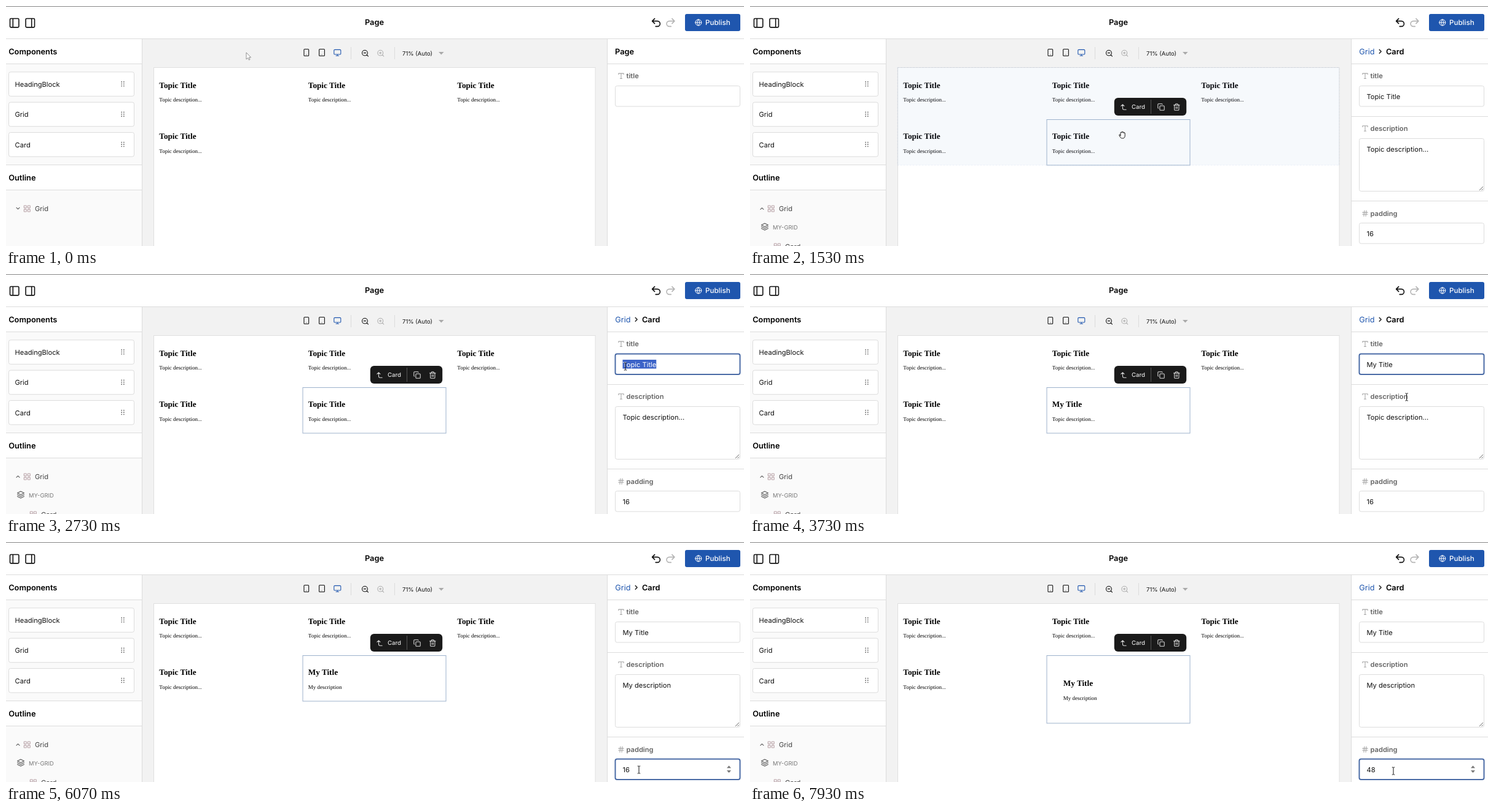
An HTML page that plays this animation: 1201x392 px, repeating every 8000 ms.

```html
<!DOCTYPE html>
<html lang="en">
<head>
<meta charset="utf-8">
<title>Page editor</title>
<style>
html, body { margin: 0; width: 100%; height: 100%; overflow: hidden; background: #fff; }
svg { display: block; width: 100%; height: 100%; }
text { font-family: Inter, sans-serif; white-space: pre; text-rendering: geometricPrecision; }
.serif { font-family: "Liberation Serif", serif; }
</style>
</head>
<body>
<svg id="stage" viewBox="0 0 1201 392"></svg>
<script>
const LOOP = 8000;
const LINE = '#dcdcdc', INK = '#111', BLUE = '#1f56ae';
const ZOOM = 0.5625;

// Markup helpers
const rect = (x, y, w, h, fill, more = '') =>
  `<rect x="${x}" y="${y}" width="${w}" height="${h}" fill="${fill}" ${more}/>`;
const line = (x1, y1, x2, y2, color = LINE) =>
  `<path d="M${x1} ${y1}L${x2} ${y2}" stroke="${color}"/>`;
const text = (x, y, size, str, fill = INK, weight = 400, more = '') =>
  `<text x="${x}" y="${y}" font-size="${size}" fill="${fill}" font-weight="${weight}" ${more}>${str}</text>`;
const group = (id, body, more = '') => `<g id="${id}" ${more}>${body}</g>`;
const icon = (x, y, scale, d, color = INK, width = 2) =>
  `<path transform="translate(${x} ${y}) scale(${scale}) translate(-12 -12)" d="${d}" fill="none"
    stroke="${color}" stroke-width="${width}" stroke-linecap="round" stroke-linejoin="round"/>`;
const box = (x, y, w, h, r = 2) =>
  `M${x + r} ${y}h${w - 2 * r}a${r} ${r} 0 0 1 ${r} ${r}v${h - 2 * r}a${r} ${r} 0 0 1 ${-r} ${r}` +
  `h${2 * r - w}a${r} ${r} 0 0 1 ${-r} ${-r}v${2 * r - h}a${r} ${r} 0 0 1 ${r} ${-r}z`;
const disc = (x, y, r) => `M${x - r} ${y}a${r} ${r} 0 1 0 ${2 * r} 0a${r} ${r} 0 1 0 ${-2 * r} 0`;

const ICON = {
  panelLeft: box(3, 3, 18, 18) + 'M9 3v18',
  panelRight: box(3, 3, 18, 18) + 'M15 3v18',
  undo: 'M9 14 4 9l5-5M4 9h10.5a5.5 5.5 0 0 1 0 11H11',
  redo: 'M15 14l5-5-5-5M20 9H9.500a5.500 5.500 0 0 0 0 11H13',
  globe: disc(12, 12, 10) + 'M2 12h20M12 2a14.500 14.500 0 0 0 0 20a14.500 14.500 0 0 0 0-20',
  phone: box(5, 2, 14, 20) + 'M12 18h.01',
  tablet: box(4, 2, 16, 20) + 'M12 18h.01',
  monitor: box(2, 3, 20, 14) + 'M8 21h8M12 17v4',
  zoomOut: disc(11, 11, 8) + 'M21 21l-4.35-4.35M8 11h6',
  zoomIn: disc(11, 11, 8) + 'M21 21l-4.35-4.35M8 11h6M11 8v6',
  type: 'M4 7V4h16v3M9 20h6M12 4v16',
  hash: 'M4 9h16M4 15h16M10 3 8 21M16 3l-2 18',
  grid: box(3, 3, 7, 7, 1) + box(14, 3, 7, 7, 1) + box(14, 14, 7, 7, 1) + box(3, 14, 7, 7, 1),
  layers: 'M12 2l10 5-10 5L2 7zM2 12l10 5 10-5M2 17l10 5 10-5',
  down: 'M6 9l6 6 6-6',
  up: 'M18 15l-6-6-6 6',
  right: 'M9 18l6-6-6-6',
  parent: 'M14 9 9 4 4 9M20 20h-7a4 4 0 0 1-4-4V4',
  copy: box(8, 8, 14, 14) + 'M4 16c-1.1 0-2-.9-2-2V4c0-1.1.9-2 2-2h10c1.1 0 2 .9 2 2',
  trash: 'M3 6h18M19 6v14a2 2 0 0 1-2 2H7a2 2 0 0 1-2-2V6M8 6V4a2 2 0 0 1 2-2h4a2 2 0 0 1 2 2v2M10 11v6M14 11v6'
};

const grip = (x, y, s = 1) => {
  let dots = '';
  for (const dx of [-1.8, 1.8])
    for (const dy of [-3.3, 0, 3.3])
      dots += `<circle cx="${x + dx * s}" cy="${y + dy * s}" r="${0.9 * s}" fill="#666"/>`;
  return dots;
};
const component = (y, name) =>
  rect(4.5, y, 204, 39.5, '#fff', `rx="3" stroke="${LINE}"`) +
  text(14.5, y + 24, 11.15, name) + grip(190, y + 19.5);
const topic = (x, y) =>
  text(x, y, 13.2, 'Topic Title', '#000', 700, 'class="serif"') +
  text(x, y + 22.8, 9, 'Topic description...', '#000', 400, 'class="serif"');
const label = (y, name, d) =>
  icon(1001, y, 0.52, d, '#a5a5a5') + text(1009.5, y + 4, 11.15, name, '#636363', 600);
const field = (id, y, h) => group(id,
  rect(991.5, y, 203, h, '#fff', 'class="frame" rx="3"') +
  rect(0, y + 9.5, 0, 14.5, '#3c63c8', 'class="sel"') +
  `<text x="1003.500" y="${y + 21}" font-size="11.150" fill="${INK}"><tspan></tspan><tspan fill="#fff"></tspan></text>` +
  rect(0, y + 10, 1.1, 14, '#000', 'class="caret"'));

const header =
  rect(0, 0, 1201, 53, '#fff') + line(0, 0.5, 1201, 0.5, '#858585') + line(0, 53.5, 1201, 53.5) +
  icon(13.7, 27.7, 0.8, ICON.panelLeft) + icon(39.3, 27.7, 0.8, ICON.panelRight) +
  text(599.5, 31.3, 12.8, 'Page', '#000', 600, 'text-anchor="middle"') +
  icon(1058, 27, 0.8, ICON.undo) + icon(1081.5, 27, 0.8, ICON.redo, '#b5b5b5') +
  rect(1105, 13, 90, 28, BLUE, 'rx="3"') + icon(1126.8, 27, 0.5, ICON.globe, '#fff') +
  text(1138, 31.2, 11.6, 'Publish', '#fff', 500);

const sidebar =
  rect(0, 54, 221, 338, '#fafafa') + rect(0, 54, 221, 40, '#fff') + rect(0, 260, 221, 40, '#fff') +
  [94.5, 259.5, 300.5].map(y => line(0, y, 221, y)).join('') + line(221.5, 54, 221.5, 392) +
  text(4.2, 78.6, 12.8, 'Components', '#000', 600) + text(4.2, 284.6, 12.8, 'Outline', '#000', 600) +
  component(107.8, 'HeadingBlock') + component(157.2, 'Grid') + component(206.5, 'Card') +
  icon(34.3, 331, 0.55, ICON.grid, '#b9a3a8') + text(47, 335, 11.15, 'Grid', '#444') +
  group('closed', icon(19.5, 330.5, 0.42, ICON.down, '#333', 2.4)) +
  group('open',
    icon(19.5, 331, 0.42, ICON.up, '#333', 2.4) + icon(24, 360.5, 0.55, ICON.layers, '#555') +
    text(37, 365.4, 9.4, 'MY-GRID', '#777') +
    icon(44.3, 393, 0.55, ICON.grid, '#b9a3a8') + text(57, 397, 11.15, 'Card', '#444'));

const toolbar =
  icon(488.8, 76, 0.55, ICON.phone) + icon(514, 76, 0.55, ICON.tablet) +
  icon(539.3, 76.3, 0.55, ICON.monitor, BLUE) +
  line(561.5, 67, 561.5, 87) + line(632.5, 67, 632.5, 87) +
  icon(584.5, 77.2, 0.55, ICON.zoomOut) + icon(609.8, 77.2, 0.55, ICON.zoomIn, '#b0b0b0') +
  text(645, 80.5, 9.5, '71% (Auto)') + '<path d="M704 75h8.600l-4.300 4.600z" fill="#aaa"/>';

const canvas =
  rect(240.5, 100.5, 718.5, 300, '#fff', 'stroke="#e0e0e0"') +
  group('dropzone',
    rect(240.5, 101, 718.5, 159, '#eff3fb', 'stroke="#8db0de" stroke-dasharray="3 2"') +
    rect(483, 185, 233.5, 75, '#c8d8ee')) +
  topic(249.3, 133.6) + topic(491.8, 133.6) + topic(734.3, 133.6) + topic(249.3, 217.3) +
  group('card',
    group('cardText',
      text(0, 217.3, 13.2, '', '#000', 700, 'id="cardTitle" class="serif"') +
      text(0, 240.1, 9, '', '#000', 400, 'id="cardDesc" class="serif"'))) +
  rect(240, 100.5, 719, 159.5, '#6f93cf', 'id="hover" fill-opacity=".25" stroke="#6f93cf" stroke-opacity=".5" stroke-dasharray="3 2"') +
  group('picked',
    rect(483, 185.5, 233, 74.5, 'none', 'id="outline" stroke="#9db2cc"') +
    rect(592.8, 150, 117.4, 29, '#1a1a1a', 'rx="6"') +
    icon(608, 165, 0.52, ICON.parent, '#ddd') + text(621, 168.2, 9.6, 'Card', '#e2e2e2', 500) +
    line(652.5, 153, 652.5, 176, '#555') +
    icon(669, 165, 0.52, ICON.copy, '#ddd') + icon(694.3, 165, 0.52, ICON.trash, '#ddd'));

const panel =
  rect(979, 54, 222, 338, '#fff') + line(978.5, 54, 978.5, 392) + line(979, 94.5, 1201, 94.5) +
  label(114.3, 'title', ICON.type) +
  group('pagePanel',
    text(991, 78.6, 12.8, 'Page', '#000', 600) +
    rect(991.5, 130.5, 203, 33.5, '#fff', `rx="3" stroke="${LINE}"`)) +
  group('cardPanel',
    text(991.3, 78.6, 12.7, 'Grid', BLUE) + icon(1025.7, 74.3, 0.5, ICON.right, INK, 2.6) +
    text(1035, 78.6, 12.7, 'Card', '#000', 600) +
    line(979, 180.5, 1201, 180.5) + line(979, 318.5, 1201, 318.5) +
    label(200, 'description', ICON.type) + label(338.7, 'padding', ICON.hash) +
    field('title', 130.5, 33.5) + field('desc', 216.5, 86) + field('pad', 354.5, 33.5) +
    line(1187, 301, 1193, 295, '#666') + line(1190.5, 301, 1193, 298.5, '#666') +
    '<path id="spin" d="M1173 369.300l3.500-4 3.500 4zM1173 373l3.500 4 3.500-4z" fill="#777"/>');

const drag =
  group('dragItem',
    rect(0, 0, 204, 39.5, '#fff', `rx="3" stroke="${LINE}"`) + text(10, 24, 11.15, 'Card') + grip(185.5, 19.5)) +
  group('dragCard',
    rect(0, 0, 232.5, 74.5, '#eff3fb', 'fill-opacity=".25" stroke="#bccfe6"') +
    rect(0, 0, 232.5, 27.5, '#fff', 'stroke="#d5dbe4"') + text(6.5, 15.7, 7, 'Card') + grip(220.3, 12.3, 0.7));

const pointers = group('cursor',
  '<path id="arrow" d="M0 0V11l2.600-2.300 1.700 3.500 1.700-.8-1.700-3.400H7.600z" fill="#fff" stroke="#777" stroke-width=".8"/>' +
  '<path id="hand" d="M-3 1.500V-3.400a.9.9 0 0 1 1.800 0v-1a.9.9 0 0 1 1.800 0v.6a.9.9 0 0 1 1.800 0v1a.9.9 0 0 1 1.800 0V1.500c0 2.500-1.300 4-3.300 4H-.5c-1.500 0-2.200-.8-3-2L-5.200.6c-.4-.9.8-1.500 1.400-.8z" fill="#fff" stroke="#000" stroke-width=".9"/>' +
  '<path id="fist" d="M-3.400 0v-2a1 1 0 0 1 1.800-.6 1 1 0 0 1 1.800-.3 1 1 0 0 1 1.800.3 1 1 0 0 1 1.800.8V1.500c0 2-1.200 3-2.800 3H-1.400c-1.600 0-3.400-1.800-3.400-3.200 0-1 .7-1.300 1.400-1.300z" fill="#fff" stroke="#000" stroke-width=".9"/>' +
  '<path id="beam" d="M-2.200-6H-.6L0-5.400.6-6H2.200M0-5.400V5.400M-2.200 6H-.6L0 5.400.6 6H2.200" fill="none" stroke="#111"/>');

const stage = document.getElementById('stage');
stage.innerHTML = rect(222, 54, 756, 338, '#f2f2f2') + sidebar + toolbar + canvas + panel + header + drag + pointers;

const el = {};
stage.querySelectorAll('[id]').forEach(node => { el[node.id] = node; });
const show = (id, on) => el[id].setAttribute('display', on ? 'inline' : 'none');
const move = (id, x, y) => el[id].setAttribute('transform', `translate(${x} ${y})`);

// Timing helpers
const span = (t, a, b) => Math.min(1, Math.max(0, (t - a) / (b - a)));
const ease = p => p * p * (3 - 2 * p);
const within = (t, a, b) => t >= a && t < b;
const latest = (t, steps) => steps.filter(s => s[0] <= t).pop()[1];

const PATH = [
  [0, 391, 76], [300, 391, 76], [680, 93, 230], [760, 93, 230], [1130, 404, 203], [1340, 572, 212],
  [1450, 574, 212], [1870, 903, 197], [2020, 1061, 149], [2130, 1060, 149], [2400, 1009, 150],
  [2700, 1009, 150], [2730, 1008, 151], [3560, 1010, 152], [3860, 1107, 233], [3960, 1107, 233],
  [4260, 973, 237], [5440, 973, 237], [5700, 1030, 372], [7500, 1030, 372], [7510, 844, 281],
  [7560, 844, 281], [7920, 1047, 374], [8000, 1047, 374]
];
const POINTER = [
  [0, 'arrow'], [660, 'hand'], [740, 'fist'], [1470, 'hand'], [1970, 'beam'], [2930, ''], [3600, 'beam'],
  [4200, 'arrow'], [5540, 'beam'], [6330, ''], [7520, 'hand'], [7730, 'arrow'], [7830, 'beam']
];
const TITLE = [[0, 'Topic Title'], [2930, 'M'], [3000, 'My'], [3200, 'My T'], [3270, 'My Tit'], [3330, 'My Title']];
const PAD = [[0, '16'], [6330, '1'], [6530, ''], [6600, '4'], [6730, '48']];

function pointAt(t) {
  const i = Math.max(1, PATH.findIndex(k => k[0] > t));
  const [a, x, y] = PATH[i - 1], [b, u, v] = PATH[i];
  const p = ease(span(t, a, b));
  return [x + (u - x) * p, y + (v - y) * p];
}

// Characters from index `from` onward are drawn selected.
function setField(id, value, from, focused, caretOn) {
  const g = el[id], frame = g.querySelector('.frame'), label = g.querySelector('text');
  const sel = g.querySelector('.sel'), caret = g.querySelector('.caret');
  label.children[0].textContent = value.slice(0, from);
  label.children[1].textContent = value.slice(from);
  const full = value ? label.getComputedTextLength() : 0;
  const cut = Math.min(from, value.length);
  const left = cut === value.length ? full : cut ? label.getSubStringLength(0, cut) : 0;
  frame.setAttribute('stroke', focused ? '#4a6ba6' : LINE);
  frame.setAttribute('stroke-width', focused ? 2 : 1);
  sel.setAttribute('x', 1003.5 + left);
  sel.setAttribute('width', full - left);
  caret.setAttribute('x', 1003.7 + left);
  caret.setAttribute('display', focused && caretOn && cut === value.length ? 'inline' : 'none');
}

function render(t) {
  const [x, y] = pointAt(t);
  const pointer = latest(t, POINTER);
  const dropped = t >= 1470, dragging = within(t, 760, 1470), overCanvas = x > 240;
  const blink = start => (t - start) % 530 < 265;

  show('closed', !dropped);
  show('open', dropped);
  show('pagePanel', !dropped);
  show('cardPanel', dropped);
  show('card', dropped);
  show('picked', dropped);
  show('dropzone', dragging && overCanvas);
  show('dragItem', dragging && !overCanvas);
  show('dragCard', dragging && overCanvas);
  move('dragItem', x - 88.5, y - 23.5);
  move('dragCard', x - 88.5, y - 23.5);

  const title = latest(t, TITLE);
  const desc = t < 4530 ? 'Topic description...'
    : 'My description'.slice(0, 2 + Math.round((t - 4530) / 67 * 12 / 11));
  const pad = latest(t, PAD);
  setField('title', title, within(t, 2200, 2930) ? Math.round(11 * (1 - span(t, 2200, 2390))) : 99,
    within(t, 2100, 3930), t < 3330 || blink(3330));
  setField('desc', desc, within(t, 3960, 4530) ? Math.round(20 * (1 - span(t, 3990, 4200))) : 99,
    within(t, 3930, 5730), true);
  setField('pad', pad, 99, t >= 5730, t < 5800 || (t < 6330 ? blink(5800) : t < 7000 || blink(7000)));
  show('spin', t >= 5670);

  const size = t < 6730 ? +pad : 4 + 44 * ease(span(t, 6710, 6990));
  const grow = Math.max(0, size - 16) * ZOOM;
  el.cardTitle.textContent = title;
  el.cardDesc.textContent = desc;
  move('cardText', 482.8 + size * ZOOM, grow);
  el.outline.setAttribute('height', 74.5 + 2 * grow);
  el.hover.setAttribute('height', 159.5 + 2 * grow);
  el.hover.setAttribute('opacity', t < 5000
    ? span(t, 1500, 1630) * (1 - span(t, 1920, 2010))
    : span(t, 7550, 7640) * (1 - span(t, 7700, 7850)));

  for (const id of ['arrow', 'hand', 'fist', 'beam']) show(id, id === pointer);
  move('cursor', x, y);
}

const start = performance.now();
function tick() {
  render((performance.now() - start) % LOOP);
  requestAnimationFrame(tick);
}
tick();
</script>
</body>
</html>
```
